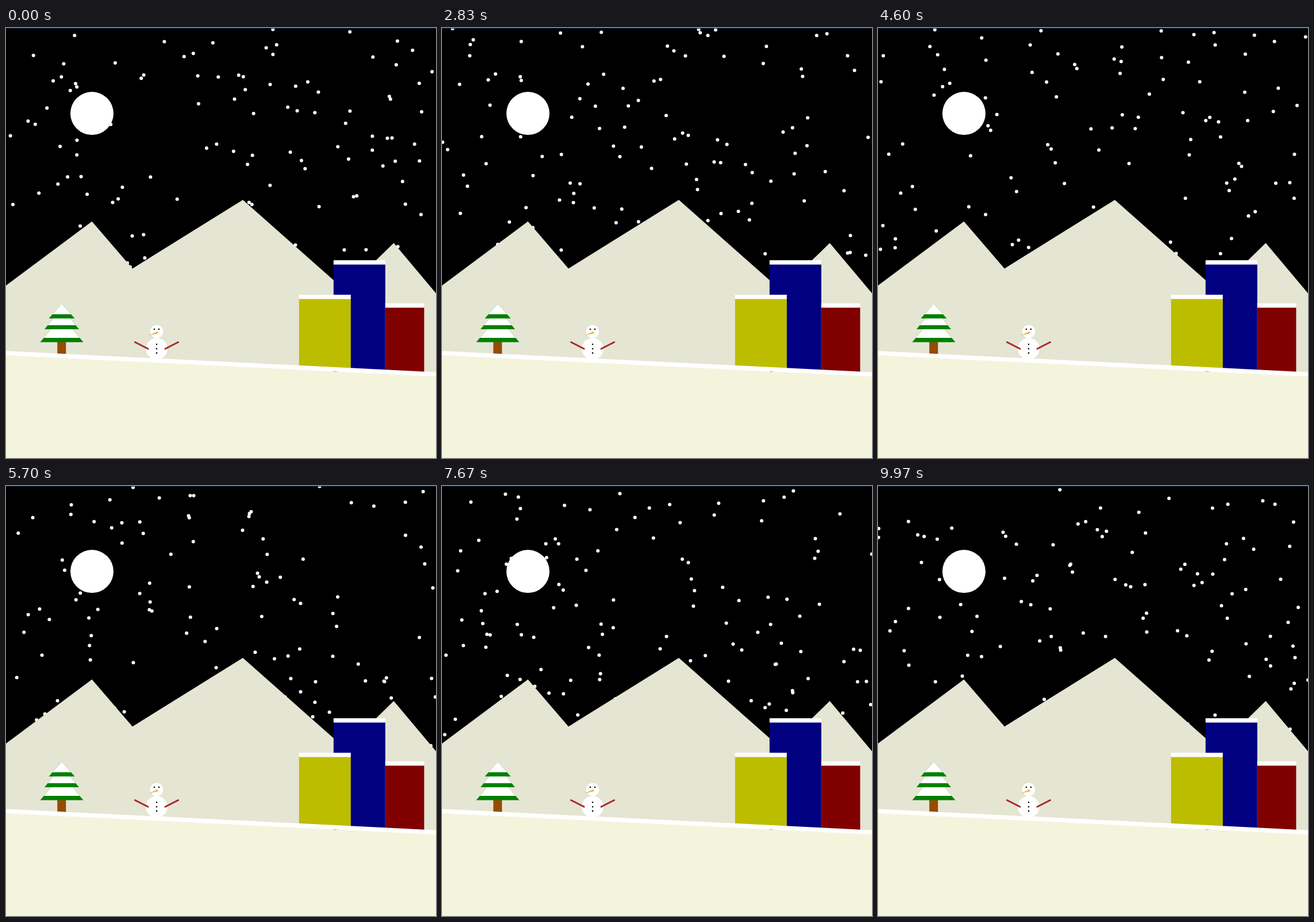
An HTML page with a canvas that plays this animation: 748 px wide and 748 px high, repeating every 10000 ms.

```html
<!DOCTYPE html>
<html lang="en">
<head>
<meta charset="utf-8">
<title>Winter night</title>
<style>
  html, body { margin: 0; width: 100%; height: 100%; overflow: hidden; background: #000; }
  canvas, svg { position: absolute; left: 0; top: 0; width: 748px; height: 748px; }
</style>
</head>
<body>
<canvas id="snow" width="748" height="748"></canvas>
<svg viewBox="0 0 748 748" fill="#fff">
  <rect width="748" height="1" fill="#0a2045"/>
  <circle cx="149.5" cy="148.6" r="37.5"/>

  <path id="mountains" fill="#e5e5d3"
        d="M0 448 149.5 336.5 220 418.5 412 299 590 456.5 674.5 374 748 461.5V610H0Z"/>
  <path id="ground" fill="#f4f3dc" d="M0 565.5 748 602.5V748H0Z"/>

  <g id="tree">
    <rect x="89.3" y="546" width="15" height="26" fill="#964b00"/>
    <path fill="#008000" d="M97 502 134.5 546.5H59.5Z"/>
    <path d="M97 502 128.2 539H65.8Z"/>
    <path fill="#008000" d="M97 487 127 524H67Z"/>
    <path d="M97 487 121.3 517H72.7Z"/>
    <path fill="#008000" d="M97 479.5 119.5 505.3H74.5Z"/>
    <path d="M97 479.5 113.2 498H80.8Z"/>
  </g>

  <g id="buildings">
    <rect x="569.8" y="411" width="90" height="187" fill="#000080"/>
    <rect x="569.8" y="404" width="90" height="7.5"/>
    <rect x="509.8" y="471" width="90" height="121" fill="#bdbd00"/>
    <rect x="509.8" y="464" width="90" height="7.5"/>
    <rect x="659.8" y="486" width="67.6" height="115" fill="#800000"/>
    <rect x="659.8" y="479" width="67.6" height="7.5"/>
  </g>

  <path id="drift" stroke="#fff" stroke-width="7.5" d="M-4 565.3 752 602.7"/>

  <g id="snowman">
    <circle cx="262" cy="558" r="18.8"/>
    <circle cx="262" cy="528" r="11.3"/>
    <path fill="#e9a820" d="M248 534.8 264 527.8V531Z"/>
    <path stroke="#a52a2a" stroke-width="3" stroke-linecap="round"
          d="M224.5 546.5 247 558M277 558 299.5 546.5"/>
    <path stroke="#000" stroke-width="2.6" stroke-linecap="round"
          d="M258 524h.01M266 524h.01M262 550.3h.01M262 558h.01M262 565.4h.01"/>
  </g>
</svg>
<script>
  const SIZE = 748, LOOP = 10000, FPS = 30, FLAKES = 200, RADIUS = 3;
  const HELD = 63; // this step repeats the one before it
  const ctx = document.getElementById('snow').getContext('2d');
  const start = performance.now();
  let shown = -1;

  function seeded(seed) {
    let s = seed;
    return () => {
      s = (s + 0x6d2b79f5) | 0;
      let t = Math.imul(s ^ (s >>> 15), s | 1);
      t ^= t + Math.imul(t ^ (t >>> 7), t | 61);
      return ((t ^ (t >>> 14)) >>> 0) / 4294967296;
    };
  }

  // Every step scatters the whole snowfall anew.
  function scatter(step) {
    const rand = seeded(step * 7919 + 17);
    ctx.fillStyle = '#000';
    ctx.fillRect(0, 0, SIZE, SIZE);
    ctx.fillStyle = '#fff';
    for (let i = 0; i < FLAKES; i++) {
      ctx.beginPath();
      ctx.arc(rand() * SIZE, rand() * SIZE, RADIUS, 0, Math.PI * 2);
      ctx.fill();
    }
  }

  function draw(now) {
    const t = Math.max(0, now - start) % LOOP;
    let step = Math.floor((t + 5) * FPS / 1000) % (LOOP * FPS / 1000);
    if (step === HELD) step--;
    if (step !== shown) scatter(shown = step);
    requestAnimationFrame(draw);
  }

  draw(start);
</script>
</body>
</html>
```
